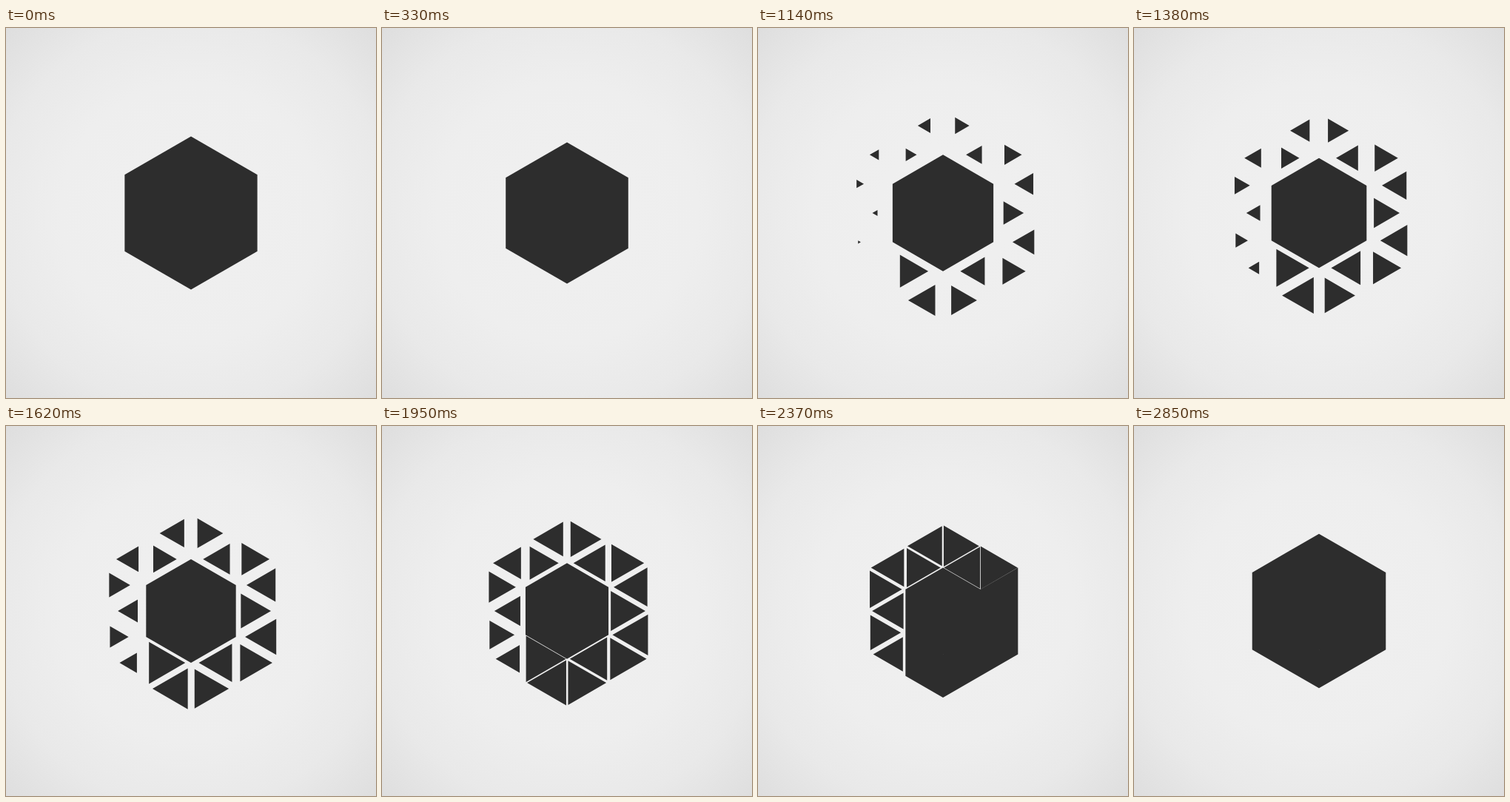
Animation of 500 by 500 pixels, one loop 2880 ms. Source, as an HTML page:

```html
<!DOCTYPE html>
<html lang="en">
<head>
<meta charset="utf-8">
<title>Hexagon</title>
<style>
  html, body { margin: 0; width: 100%; height: 100%; overflow: hidden; background: #eee; }
  svg { display: block; width: 100%; height: 100%; }
</style>
</head>
<body>
<svg viewBox="0 0 500 500">
  <defs>
    <radialGradient id="paper" gradientUnits="userSpaceOnUse" cx="250" cy="250" r="354">
      <stop offset="0" stop-color="#f0f0f0"/>
      <stop offset=".5" stop-color="#eeeeee"/>
      <stop offset=".75" stop-color="#e9e9e9"/>
      <stop offset="1" stop-color="#dedede"/>
    </radialGradient>
  </defs>
  <rect width="500" height="500" fill="url(#paper)"/>
  <path id="shape" fill="#2d2d2d"/>
</svg>
<script>
const LOOP = 2880, STEP = 30;
const FIRST = 370, STAGGER = 46, GROW = 1660;
const DEG = Math.PI / 180;
const shape = document.getElementById('shape');

// Centres of the 18 triangles around a unit hexagon, anticlockwise from lower left
const ring = Array.from({ length: 18 }, (_, i) => {
  const angle = (120 - 60 * Math.floor(i / 3) - [0, 19.107, 40.893][i % 3]) * DEG;
  const radius = i % 3 ? Math.sqrt(7 / 3) : 2 / Math.sqrt(3);
  return { x: radius * Math.cos(angle), y: radius * Math.sin(angle), turn: i % 2 ? 180 : 0 };
});

function polygon(x, y, radius, sides, turn) {
  const points = Array.from({ length: sides }, (_, i) => {
    const angle = (turn + 360 * i / sides) * DEG;
    return (x + radius * Math.cos(angle)).toFixed(3) + ' ' + (y + radius * Math.sin(angle)).toFixed(3);
  });
  return 'M' + points.join('L') + 'Z';
}

function draw(t) {
  // The core halves each loop, so core plus ring ends at the starting size
  const size = 104.25 * 2 ** (-(t + STEP) / LOOP);
  let d = polygon(250, 250, size, 6, 30);
  ring.forEach(({ x, y, turn }, i) => {
    const age = (t - FIRST - STAGGER * i) / GROW;
    if (age <= 0) return;
    const scale = Math.min(1, age) ** 0.75;
    d += polygon(250 + x * size, 250 + y * size, scale * size / Math.sqrt(3), 3, turn);
  });
  shape.setAttribute('d', d);
}

const start = performance.now();
function tick() {
  const t = (performance.now() - start) % LOOP;
  draw(Math.floor(t / STEP) * STEP);
  requestAnimationFrame(tick);
}
tick();
</script>
</body>
</html>
```
